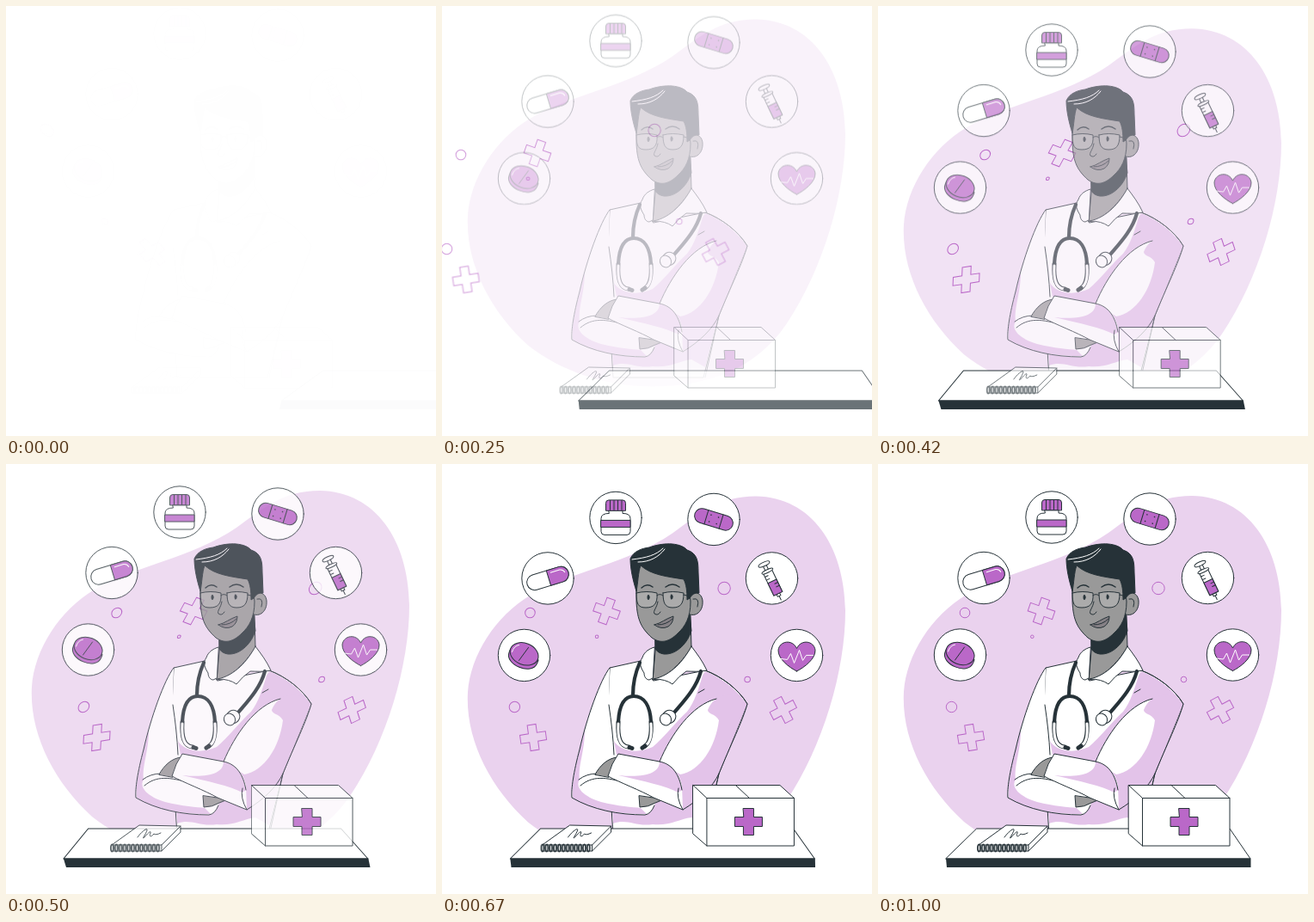
An HTML page for the animation above (1040 ms loop, 500 by 500 pixels).

```html
<!DOCTYPE html>
<html lang="en">
<head>
<meta charset="utf-8">
<title>Doctor</title>
<style>
html, body { margin: 0; width: 100%; height: 100%; overflow: hidden; background: #fff; }
svg { display: block; width: 100%; height: 100%; }
.ink { stroke: #263238; stroke-width: 1; stroke-linecap: round; stroke-linejoin: round; }
.white { fill: #fff; }
.purple { fill: #ba68c8; }
.shade { fill: #e3c3e9; stroke: none; }
.skin { fill: #999; }
.dark { fill: #263238; }
.line { fill: none; }
.tube { fill: none; stroke-width: 4.2; }

/* Animating plain values keeps thin lines sharp while they move. */
@property --x { syntax: '<length>'; inherits: false; initial-value: 0px }
@property --y { syntax: '<length>'; inherits: false; initial-value: 0px }
@property --skew { syntax: '<angle>'; inherits: false; initial-value: 0deg }
@property --show { syntax: '<number>'; inherits: false; initial-value: 1 }
.move {
  opacity: var(--show);
  transform: translate(var(--x), var(--y)) skewX(var(--skew));
  animation: 1s cubic-bezier(.36, -.01, .5, 1.38) both paused;
}
.down { animation-name: down; }
.fade { animation-name: fade; }
.from-left { animation-name: from-left; }
.from-right { animation-name: from-right; }
.dash-left { animation-name: dash-left; transform-origin: 0 235px; }
.dash-right { animation-name: dash-right; transform-origin: 0 446px; }
@keyframes fade { from { --show: 0 } to { --show: 1 } }
@keyframes down { from { --show: 0; --y: -30px } to { --show: 1; --y: 0px } }
@keyframes from-left { from { --show: 0; --x: -30px } to { --show: 1; --x: 0px } }
@keyframes from-right { from { --show: 0; --x: 30px } to { --show: 1; --x: 0px } }
@keyframes dash-left {
  0% { --show: 0; --x: -250px; --skew: 20deg }
  60% { --show: 1; --x: 0px; --skew: -10deg }
  80% { --show: 1; --x: 0px; --skew: 2deg }
  100% { --show: 1; --x: 0px; --skew: 0deg }
}
@keyframes dash-right {
  0% { --show: 0; --x: 250px; --skew: -20deg }
  60% { --show: 1; --x: 0px; --skew: 10deg }
  80% { --show: 1; --x: 0px; --skew: -2deg }
  100% { --show: 1; --x: 0px; --skew: 0deg }
}
</style>
</head>
<body>
<svg viewBox="0 0 500 500">
  <defs>
    <path id="plus" d="M-5-15h10v10h10v10h-10v10h-10v-10h-10v-10h10z"/>
    <circle id="disc" r="30.2" class="white"/>
    <pattern id="rings" x="115" y="441" width="4.85" height="11" patternUnits="userSpaceOnUse">
      <ellipse cx="2.4" cy="5.5" rx="1.5" ry="4.2" fill="#fff" stroke="#263238" stroke-width="1.7"/>
    </pattern>
  </defs>

  <!-- Backdrop -->
  <path class="move down" fill="#ead2ee" d="M30 265C33 222 62 176 103 152C150 124 215 116 268 80C300 57 322 37 365 37C430 38 468 95 469 170C469 240 443 328 400 392C365 443 310 464 245 464C190 464 138 446 100 416C56 376 27 320 30 265Z"/>

  <!-- Floating signs -->
  <g class="move dash-left" fill="none" stroke="#ba68c8">
    <use href="#plus" transform="translate(190 171) rotate(19)"/>
    <use href="#plus" transform="translate(108 318) rotate(-9)"/>
    <use href="#plus" transform="translate(398 286) rotate(-28)"/>
    <circle cx="326" cy="144.5" r="7.2"/>
    <circle cx="101" cy="173" r="5.8"/>
    <circle cx="85.5" cy="282.5" r="6.2"/>
    <circle cx="355.5" cy="250.5" r="3.3"/>
    <circle cx="179.3" cy="200.8" r="1.8"/>
  </g>

  <!-- Round icons -->
  <g class="move down ink">
    <g transform="translate(202 62)">
      <use href="#disc"/>
      <path class="white" d="M-8-8.500H8V-5Q17-5 17 1V16Q17 20 13 20H-13Q-17 20-17 16V1Q-17-5-8-5Z"/>
      <path class="purple" d="M-17 3H17V11H-17ZM-11.500-8.500V-17Q-11.500-20.500-8-20.500H8Q11.500-20.500 11.500-17V-8.500Z"/>
      <path class="line" d="M-6.500-20V-9M-2-20V-9M2.500-20V-9M7-20V-9"/>
    </g>
    <g transform="translate(316 64)">
      <use href="#disc"/>
      <g transform="rotate(17)">
        <rect class="purple" x="-23" y="-8.500" width="46" height="17" rx="8.500"/>
        <path class="line" d="M-9-8.500V8.500M9-8.500V8.500"/>
        <path class="line" stroke-width="1.500" d="M-4.500-4h.1M4.500-4h.1M-4.500 4h.1M4.500 4h.1"/>
      </g>
    </g>
    <g transform="translate(383.500 132.500)">
      <use href="#disc"/>
      <g transform="translate(0 2.500) rotate(-25.500)">
        <path class="white" d="M-2-21H2V-12H-2ZM-2 17H2V20H-2Z"/>
        <ellipse class="white" cy="-21" rx="7" ry="2.300"/>
        <path class="white" d="M-5.500-12H5.500V17H-5.500Z"/>
        <path class="purple" d="M-5.500 1H5.500V17H-5.500Z"/>
        <ellipse class="white" cy="-12" rx="7" ry="1.800"/>
        <path class="line" d="M0 20V25M-5.500-7h4M-5.500-3h4M1.500 5h4M1.500 9h4"/>
      </g>
    </g>
    <g transform="translate(412.500 222)">
      <use href="#disc"/>
      <path class="purple" d="M0 18.500C-9 14-22 4-21.500-6C-20-17-5-19 0-8C5-19 20-17 21.500-6C22 4 9 14 0 18.500Z"/>
      <path class="line" stroke="#fff" d="M-19 4L-11 5L-7-2L-3 9L3-6L7 6L11 0L19 0"/>
    </g>
    <g transform="translate(95.500 222)">
      <use href="#disc"/>
      <g transform="rotate(22)">
        <path class="purple" d="M-17.500-1V3C-17.500 19 17.500 19 17.500 3V-1Z"/>
        <ellipse class="purple" cx="-.5" cy="-1.500" rx="17" ry="12.500"/>
      </g>
      <path class="line" d="M-6 6L5-9"/>
      <path class="line" stroke="#fff" d="M-14-4Q-12-11-6-12"/>
    </g>
    <g transform="translate(123 132.500)">
      <use href="#disc"/>
      <g transform="rotate(-17)">
        <rect class="white" x="-25" y="-9" width="50" height="18" rx="9"/>
        <path class="purple" d="M1-9H16A9 9 0 0 1 16 9H1Z"/>
        <path class="line" stroke="#fff" d="M5-5.500H16Q20-5 21-1"/>
      </g>
    </g>
  </g>

  <!-- Doctor -->
  <g class="move fade ink">
    <path class="white" d="M231 229L195 237L193 280C197 310 199 340 197 400L199 432H304L322 360L355 279C345 262 325 247 306 240L246 252Z"/>
    <path class="shade" d="M198 402L199 418C215 412 225 422 245 419C265 421 275 413 290 411L306 420L321 362L270 385Z"/>
    <path class="shade" d="M200 322C206 333 226 338 245 329C258 318 270 302 285 288C294 276 298 262 303 246L306 241C325 248 345 264 354 279L320 290L253 347L203 338Z"/>

    <!-- Arm on the left -->
    <path class="white" stroke="none" d="M195 237C184 251 168 296 160 332C153 358 150 378 151 388C175 402 205 408 236 408Q243 407 247 397L252 385L200 350C200 320 197 295 194 280Z"/>
    <path class="shade" d="M166 309C166 335 158 350 160 367C154 376 165 387 185 393C205 398 222 399 231 400L238 407C205 408 170 401 152 388C150 368 157 343 166 309Z"/>
    <path class="line" d="M195 237C184 251 168 296 160 332C153 358 150 378 151 388C175 402 205 408 236 408Q243 407 247 397M194 280C197 300 199 318 200 338M159 367Q168 360 180 360M161 374C175 362 190 364 215 371"/>
    <path class="skin" d="M178 361C184 350 193 342 204 341L194 364Z"/>
    <path class="skin" d="M229 386L230 399Q240 399 248 394L258 390Z"/>

    <!-- Arm on the right -->
    <path class="shade" d="M318 272C290 280 266 315 253 346L280 402C300 390 315 375 322 360L355 279C345 268 335 265 318 272Z"/>
    <path class="white" stroke="none" d="M319 273C290 280 266 315 253 346L277 361C300 357 318 330 322 298C318 290 309 291 309 286Q312 278 319 273Z"/>
    <path class="white" stroke="none" d="M205 337L253 346C268 350 276 360 279 374L280 402L246 388C232 380 206 370 193 363Q197 348 205 337Z"/>
    <path class="shade" d="M253 346C268 349 276 361 279 379L275 382C260 374 235 369 205 362C235 365 253 360 253 346Z"/>
    <path class="line" d="M319 273C290 280 266 315 253 346M279 379C276 361 268 349 253 346L205 337Q197 348 193 363C206 370 232 380 246 388L280 402C300 390 315 375 322 360C335 328 350 298 355 279C345 262 325 247 306 240M275 377Q272 388 280 402M322 360L306 432M298 266L305 262"/>

    <!-- Neck and collar -->
    <path class="skin" d="M249 206L245 251C262 248 278 232 290 213L289 176Z"/>
    <path class="dark" d="M248 203C262 206 280 190 288 174L290 194C284 212 270 222 258 221Q251 220 248 215Z"/>
    <path class="white" d="M247 213C240 215 235 219 233 225C228 232 232 238 235 243C235 248 238 251 241 251L245 249Z"/>
    <path class="white" d="M290 212C296 220 303 229 308 240C299 242 291 241 284 241Q275 247 268 256Q260 250 246 250C266 246 281 229 290 212Z"/>

    <!-- Head -->
    <path class="skin" d="M286 154C290 147 302 148 303 159C304 171 295 179 286 174Z"/>
    <path class="skin" d="M226 120L226 160C227 182 232 191 244 202C255 210 265 206 274 197C283 189 289 178 289 160L284 110L240 108Z"/>
    <path class="dark" d="M226 148C222 135 219 122 219 110C223 101 233 98 241 97C254 92 276 90 285 100C297 104 298 113 298 126L299 150Q292 149 288 156L285 158C285 147 284 140 281 134C262 131 243 129 231 118C228 126 228 138 226 148Z"/>
    <path class="line" stroke="#fff" d="M221 111C238 109 249 106 257 98M228 114C242 114 252 108 259 99"/>
    <path class="line" d="M292 157Q300 155 297 166M251 160C250 167 245 171 247 174Q251 177 254 172"/>
    <path class="line" stroke-width="1.500" d="M232 144Q238 138 245 143M260 143Q268 137 276 143"/>
    <path d="M247 187C255 185 260 180 269 177Q269 185 263 189Q255 193 247 187Z" fill="#858085"/>
    <path class="line" d="M251 187Q261 187 268 180"/>
    <g fill="#fff" fill-opacity=".18">
      <path d="M226 150Q238 147 250 150C251 163 246 167 237 167C228 167 226 163 226 150Z"/>
      <path d="M257 150Q268 147 281 150C281 163 277 167 268 167C259 167 257 161 257 150Z"/>
    </g>
    <path class="line" d="M250 153Q253 150 257 153M281 152L288 154"/>
    <ellipse class="dark" cx="240" cy="155" rx="1" ry="2.800"/>
    <ellipse class="dark" cx="267" cy="154.500" rx="1" ry="2.800"/>

    <!-- Stethoscope -->
    <path class="tube" d="M230 231C225 242 222 255 222 269M301 241C296 260 282 275 270 289"/>
    <path class="tube" d="M205 300C206 280 212 270 223 270C235 270 242 281 243 300"/>
    <g fill="none">
      <path stroke-width="5" d="M205 300C204 318 207 328 217 329M243 300C244 315 242 324 236 328"/>
      <path stroke="#fff" stroke-width="3" d="M205 302C204 318 207 328 216 329M243 302C244 315 242 324 237 327"/>
      <path stroke-width="5" d="M218 329.500L221 330.500M236 328L233 330"/>
    </g>
    <ellipse class="white" cx="264" cy="294" rx="8" ry="7.500" transform="rotate(-30 264 294)"/>
    <ellipse class="white" cx="260" cy="297" rx="6.500" ry="7" transform="rotate(-30 260 297)"/>
  </g>

  <!-- Table -->
  <g class="move dash-right ink">
    <path class="white" d="M115 424H409L433 459H79Z"/>
    <path class="dark" stroke="none" d="M79 458.500H433.500V469H80Z"/>
  </g>

  <!-- First-aid box -->
  <g class="move from-left ink">
    <path class="white" d="M291.500 373.500H392.500L409 388.500V444H307.500L291.500 430Z"/>
    <path class="line" d="M291.500 373.500L307.500 388.500H409M307.500 388.500V444M341 373.500L357 388.500"/>
    <path class="purple" d="M350 400.500h12v10h10v11h-10v10h-12v-10h-10v-11h10z"/>
  </g>

  <!-- Notebook -->
  <g class="move from-right ink">
    <path class="white" d="M117 443L149 420L197 421V428L175 450H117Z"/>
    <path class="line" d="M117 443H175L197 421M175 443V450"/>
    <path class="line" d="M147 434C152 427 159 422 158 426C156 432 151 437 155 434C160 428 163 426 162 429C160 434 163 434 166 430Q168 432 174 429"/>
    <path fill="url(#rings)" stroke="none" d="M115 441H173.200V452H115Z"/>
  </g>
</svg>
<script>
const LOOP = 1040, STEP = 1000 / 24, LEAD = 31;
const parts = document.getAnimations();

// Motion advances at 24 steps a second, with a longer hold on the first one.
function draw() {
  const t = performance.now() % LOOP;
  const time = t < 79 ? 42 : Math.floor((t + 6) / STEP) * STEP + LEAD;
  for (const part of parts) part.currentTime = time;
  requestAnimationFrame(draw);
}
draw();
</script>
</body>
</html>
```
